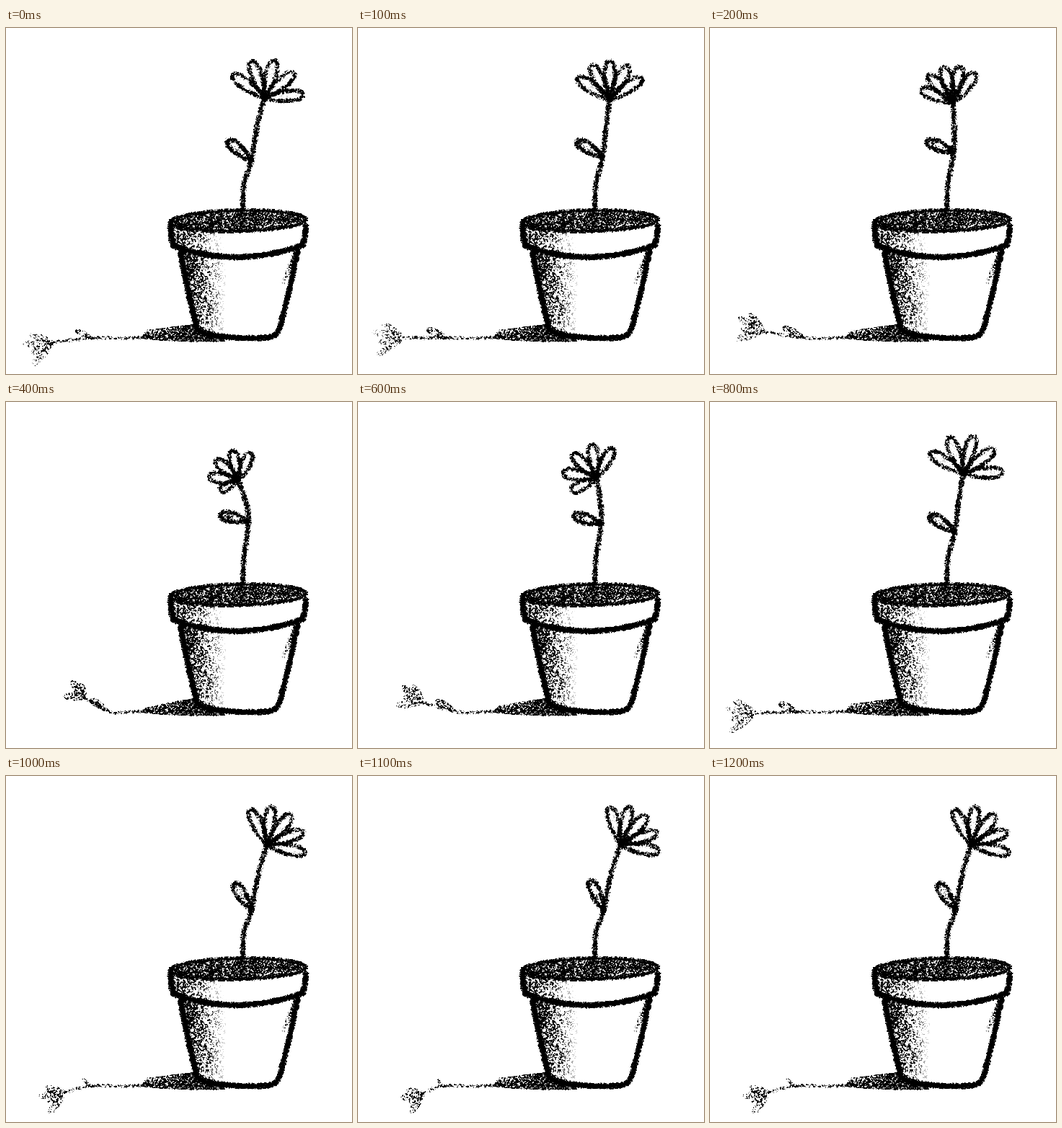
These frames come from a looping animation (480x480 px, 1.3 s). An HTML page with a canvas:

```html
<!DOCTYPE html>
<html lang="en">
<head>
<meta charset="utf-8">
<title>Swaying flower</title>
<style>
  html, body { margin: 0; width: 100%; height: 100%; overflow: hidden; background: #fff; }
  canvas { display: block; width: 480px; height: 480px; }
</style>
</head>
<body>
<canvas id="stage" width="480" height="480"></canvas>
<script>
const SIZE = 480, STEP = 100, LOOP = 1300;
const view = document.getElementById('stage').getContext('2d');

// The flower falls left, swings back, then rests on the right with a small overshoot.
const FALL_START = 1200 - LOOP, LOW = 420, REST = 1000;

function swing(ms) {
  const t = ms > 1200 ? ms - LOOP : ms;
  const resting = t >= REST;
  let sway, close = 0;
  if (resting) {
    sway = 1 + .1 * Math.sin(Math.PI * (t - REST) / 200);
  } else if (t > LOW) {
    sway = -Math.cos(Math.PI * (t - LOW) / (REST - LOW));
  } else {
    const phase = Math.PI * (t - FALL_START) / (LOW - FALL_START);
    sway = Math.cos(phase);
    close = Math.sin(phase) ** 4;
  }
  return {
    sway, close,
    flutter: resting ? 0 : 5 + 10 * Math.cos(2 * Math.PI * t / 600),
    droop: Math.max(0, -sway),
    lift: Math.max(0, sway - .8) * 5
  };
}

function spline(p) {
  const path = new Path2D();
  const at = i => p[Math.max(0, Math.min(p.length - 1, i))];
  path.moveTo(...p[0]);
  for (let i = 0; i < p.length - 1; i++) {
    const [a, b, c, d] = [at(i - 1), at(i), at(i + 1), at(i + 2)];
    path.bezierCurveTo(
      b[0] + (c[0] - a[0]) / 6, b[1] + (c[1] - a[1]) / 6,
      c[0] - (d[0] - b[0]) / 6, c[1] - (d[1] - b[1]) / 6, c[0], c[1]);
  }
  return path;
}

function petal([x, y], [tx, ty], fat) {
  const dx = tx - x, dy = ty - y, len = Math.hypot(dx, dy) || 1;
  const w = Math.min(fat, len * .22), nx = -dy / len * w, ny = dx / len * w;
  const path = new Path2D();
  path.moveTo(x, y);
  path.bezierCurveTo(x + dx * .45 + nx, y + dy * .45 + ny, tx + nx, ty + ny, tx, ty);
  path.bezierCurveTo(tx - nx, ty - ny, x + dx * .45 - nx, y + dy * .45 - ny, x, y);
  return path;
}

// Petals spread evenly around an axis, in degrees above the horizontal.
function fan(base, count, axis, spread, length, fat) {
  return Array.from({ length: count }, (_, i) => {
    const angle = (axis + spread * (.5 - i / (count - 1))) * Math.PI / 180;
    const reach = length(i);
    return petal(base, [base[0] + reach * Math.cos(angle), base[1] - reach * Math.sin(angle)], fat);
  });
}

// Ink density is collected in the alpha channel, then broken up by paper grain.
const ink = new OffscreenCanvas(SIZE, SIZE).getContext('2d', { willReadFrequently: true });
ink.lineCap = ink.lineJoin = 'round';
const black = a => `rgba(0,0,0,${Math.min(1, a)})`;

function fill(path, paint) {
  ink.fillStyle = typeof paint === 'number' ? black(paint) : paint;
  ink.fill(path);
}

function chalk(path, width, strength = 1) {
  for (const [scale, a] of [[1.3, .22], [1, .45], [.55, .55]]) {
    ink.lineWidth = width * scale;
    ink.strokeStyle = black(a * strength);
    ink.stroke(path);
  }
}

function fade(x0, x1, from, to) {
  const g = ink.createLinearGradient(x0, 0, x1, 0);
  g.addColorStop(0, black(from));
  g.addColorStop(1, black(to));
  return g;
}

function makeGrain() {
  let seed = 71;
  const random = () => {
    seed = (seed * 1664525 + 1013904223) >>> 0;
    return seed / 4294967296;
  };
  const raw = Float32Array.from({ length: SIZE * SIZE + SIZE + 1 }, random);
  return Float32Array.from({ length: SIZE * SIZE }, (_, i) => {
    const mean = (raw[i] + raw[i + 1] + raw[i + SIZE] + raw[i + SIZE + 1]) / 4;
    return Math.max(.18, Math.min(.82, .5 + (mean - .5) * 1.7));
  });
}
const grain = makeGrain();

function drawShadow({ sway, droop, lift }) {
  const top = 419 + 5 * droop;
  fill(new Path2D(`M275 410 Q236 413 194 ${top} L187 431 Q230 437 304 435 L300 420Z`), fade(185, 275, .55, .78));

  const node = [131 - 13 * sway, 430];
  const base = [66 + 46 * droop + 18 * lift, 425 + 13 * sway];
  const leaf = [95 + 22 * droop + 10 * lift, 416 + 4 * sway];
  chalk(spline([[195, 429], [165, 430], node, base]), 5, .5);
  fill(petal(node, leaf, 7), .5);
  const length = i => 47 - 14 * droop - 8 * lift - 9 * (i % 2);
  for (const shape of fan(base, 4, 170 - 30 * sway + 60 * sway, 62, length, 7)) {
    fill(shape, fade(20, 100, .26, .42));
  }
}

function drawPot() {
  const body = new Path2D('M227 272 L232 303 L241 312 L265 420 Q320 434 374 428 L405 308 L412 301 L416 270Z');
  ink.globalCompositeOperation = 'destination-out';
  fill(body, 1);
  ink.globalCompositeOperation = 'source-over';

  fill(new Path2D('M230 276 Q262 284 302 286 V315 Q260 314 233 302Z'), fade(226, 300, .72, .05));
  fill(new Path2D('M240 310 Q275 318 306 319 L302 424 L265 420Z'), fade(240, 302, .84, .08));
  chalk(new Path2D('M400 313 L386 352'), 6, .4);

  const soil = new Path2D();
  soil.ellipse(322, 267.5, 95, 15, -.02, 0, 2 * Math.PI);
  fill(soil, .7);
  chalk(soil, 4.5);

  const edge = d => chalk(new Path2D(d), 7.5, 1.6);
  edge('M228 273 Q228 290 232 302 Q268 317 321 318 Q374 316 412 301 Q415 290 416 275');
  edge('M242 313 Q252 368 265 417 Q274 427 320 430 Q346 431 365 429 Q377 427 380 415 Q395 360 404 310');
}

function drawPlant({ sway, close, flutter, droop, lift }) {
  const node = [338.5 + 2 * sway, 175 + 11 * sway];
  const bend = [341 + 9 * sway, 136];
  const head = [342 + 20 * sway, 102 - 6 * sway];
  const leaf = [302 + 5 * sway + 10 * lift, 157 - 8 * lift];
  chalk(spline([[328, 252], [330, 218], node, bend, head]), 7.5);

  const blade = petal(node, leaf, 9);
  fill(blade, .25 + .2 * droop);
  chalk(blade, 6);

  const axis = 95 - 43 * sway + flutter;
  const spread = 146 - 46 * close - 20 * lift;
  const length = i => (54 - 13 * droop) * (i ? 1 : 1 - .28 * droop);
  for (const shape of fan(head, 5, axis, spread, length, 9.5)) {
    fill(shape, .08);
    chalk(shape, 6, .85);
  }
}

function render(ms) {
  const pose = swing(ms);
  ink.clearRect(0, 0, SIZE, SIZE);
  drawShadow(pose);
  drawPot();
  drawPlant(pose);

  const image = ink.getImageData(0, 0, SIZE, SIZE), px = image.data;
  for (let i = 0; i < grain.length; i++) {
    const density = px[i * 4 + 3] / 255;
    const cover = Math.max(0, Math.min(1, .5 + (density - grain[i]) * 3.5));
    px.fill(255 * (1 - cover), i * 4, i * 4 + 3);
    px[i * 4 + 3] = 255;
  }
  return image;
}

const pictures = Array.from({ length: LOOP / STEP }, (_, i) => render(i * STEP));
const start = performance.now();
let shown = -1;

function play() {
  const elapsed = Math.max(0, performance.now() - start);
  const step = Math.floor(elapsed / STEP) % pictures.length;
  if (step !== shown) view.putImageData(pictures[shown = step], 0, 0);
  requestAnimationFrame(play);
}
play();
</script>
</body>
</html>
```
